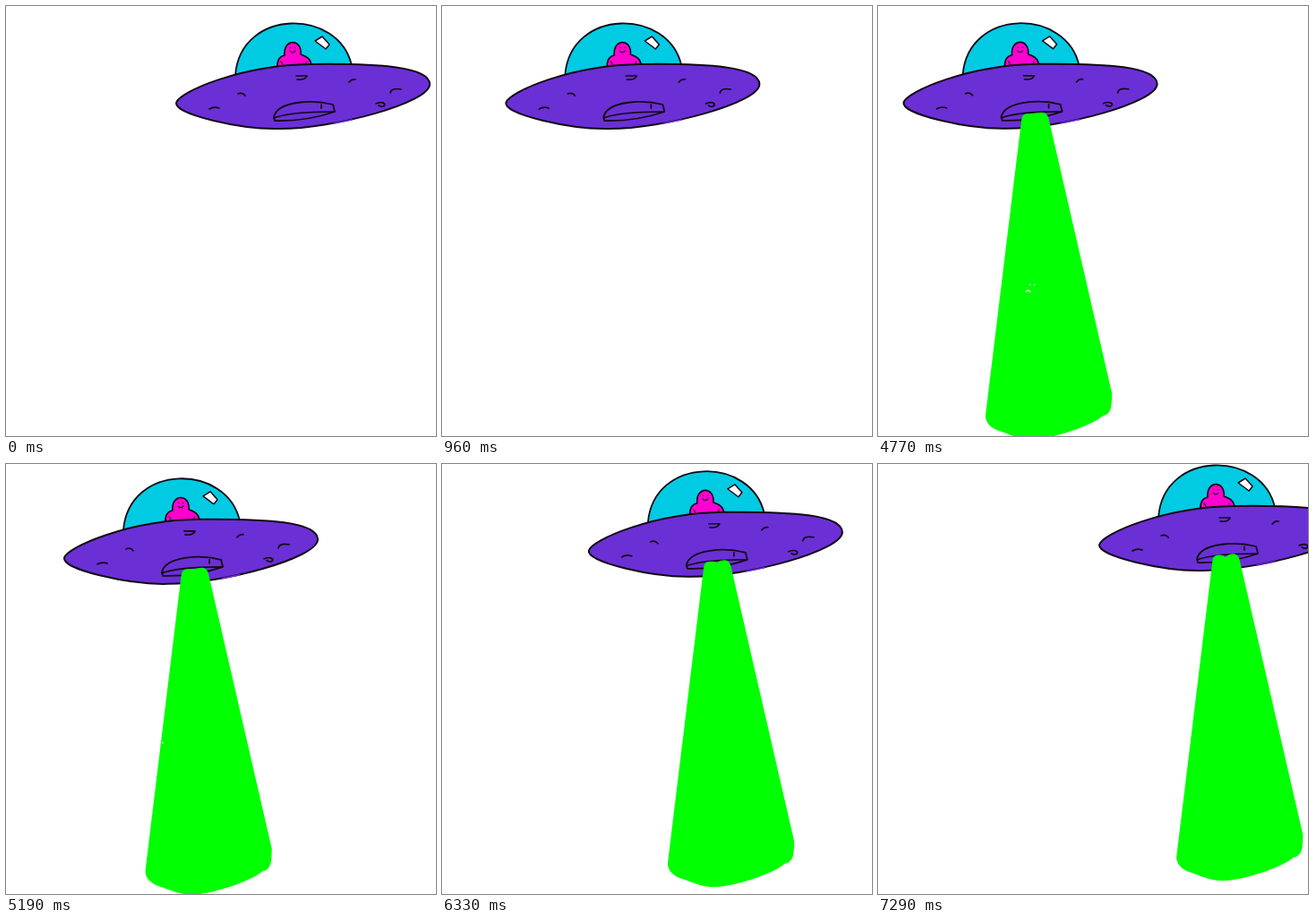
An HTML page with a canvas for the animation above (7320 ms loop, 480 by 480 pixels).

```html
<!DOCTYPE html>
<html lang="en">
<head>
<meta charset="utf-8">
<title>Flying saucer</title>
<style>
html, body { margin: 0; width: 100%; height: 100%; overflow: hidden; background: #fff; }
canvas { display: block; width: 480px; height: 480px; }
</style>
</head>
<body>
<canvas id="stage" width="480" height="480"></canvas>
<script>
const ctx = document.getElementById('stage').getContext('2d');
const LOOP = 7320, STEP = 30;
const ARRIVAL = 1410, BEAM_ON = 2080, FACE_ON = 2320, LIFT_OFF = 4740;
const START_X = 190, HOVER_X = 26;
const INK = '#120812', PURPLE = '#6b2fd6', CYAN = '#00cbe3', PINK = '#ff00d0', GREEN = '#00ff00';

const dome = new Path2D('M256 77C262 2 372 2 386 67');
const glint = new Path2D('M345 39L353 34L361 43L357 48Z');
const alien = new Path2D('M303 70C302 60 306 56 311 55C309 36 331 36 329 54C338 57 341 61 341 68');
const hull = new Path2D(
  'M190 108C193 96 262 66 340 65S472 68 473 87C474 108 366 137 305 137C262 138 188 121 190 108Z');
const hatch = new Path2D('M299 124C303 106 342 104 365 110L367 118Q335 129 300 128Z');
const hatchLip = new Path2D('M299 125Q317 118 366 118M352 110V114');
const craters = new Path2D(
  'M227 115Q232 112 238 114M259 98Q264 96 267 100M383 85Q386 81 390 82M429 97Q430 91 441 93' +
  'M324 78H336Q334 83 325 82M413 109Q421 106 423 110Q421 114 416 111');
const frown = new Path2D('M165 319Q167 316 170 319');

function outline(path, width = 1.8, color = INK) {
  ctx.lineWidth = width;
  ctx.strokeStyle = color;
  ctx.stroke(path);
}

function shape(path, color, width) {
  ctx.fillStyle = color;
  ctx.fill(path);
  outline(path, width);
}

function dots(x, y, gap, size, color) {
  ctx.fillStyle = color;
  ctx.fillRect(x, y, size, size);
  ctx.fillRect(x + gap, y, size, size);
}

function drawSaucer(x, y) {
  ctx.save();
  ctx.translate(x - START_X, y);
  shape(dome, CYAN);
  shape(glint, '#fff', 1.5);
  shape(alien, PINK, 1.6);
  outline(new Path2D('M317 50Q320 54 323 50M307 62Q310 65 308 69M335 62V68'), 1.1);
  dots(317, 46, 5, 1.2, INK);
  shape(hull, PURPLE, 2);
  outline(new Path2D('M366 131L386 127'), 1.6, PURPLE);
  outline(hatch);
  outline(hatchLip, 1.7);
  outline(craters, 1.7);
  ctx.restore();
}

// The top edge splits into two bumps as the notch rises
function drawBeam(x, y, scaleX, scaleY, notch) {
  const path = new Path2D(
    `M117.5 457L157.5 128Q158 120 165 120.5Q170 120 172 ${120 + notch}Q176 119 181 119Q186 119 188 126` +
    'L258.7 433C258 442 260 456 248 458C236 469 190 484 169 484C155 484 144 478 131 474Q117 468 117.5 457Z');
  ctx.save();
  ctx.translate(172 + x, 120 + y);
  ctx.scale(scaleX, scaleY);
  ctx.translate(-172, -120);
  ctx.fillStyle = GREEN;
  ctx.fill(path);
  ctx.restore();
}

function render(time) {
  const t = time % LOOP;
  const stepped = Math.floor(t / STEP) * STEP;
  const remaining = Math.max(0, 1 - stepped / ARRIVAL);
  const flight = Math.max(0, stepped - LIFT_OFF);
  const flashing = start => t >= start && t < start + STEP;

  ctx.fillStyle = '#fff';
  ctx.fillRect(0, 0, 480, 480);
  ctx.lineCap = ctx.lineJoin = 'round';

  const approachX = HOVER_X + (START_X - HOVER_X) * remaining ** 1.125;
  drawSaucer(approachX + flight * 0.0867, -flight * 0.00706);

  // Two short flashes before the beam stays on
  if (t >= BEAM_ON) drawBeam(flight * 0.0846, -flight * 0.0074, 1, 1, flight / 850);
  else if (flashing(1570)) drawBeam(0, 0, 0.93, 0.94, 0);
  else if (flashing(1780)) drawBeam(0, 0, 0.94, 0.983, 0);

  if (t >= FACE_ON) {
    outline(frown, 1.3, '#fff');
    dots(169, 310.5, 5, 1.4, '#fff');
  }
}

const start = performance.now();
function tick(now) {
  render(Math.max(0, now - start));
  requestAnimationFrame(tick);
}
render(0);
requestAnimationFrame(tick);
</script>
</body>
</html>
```
